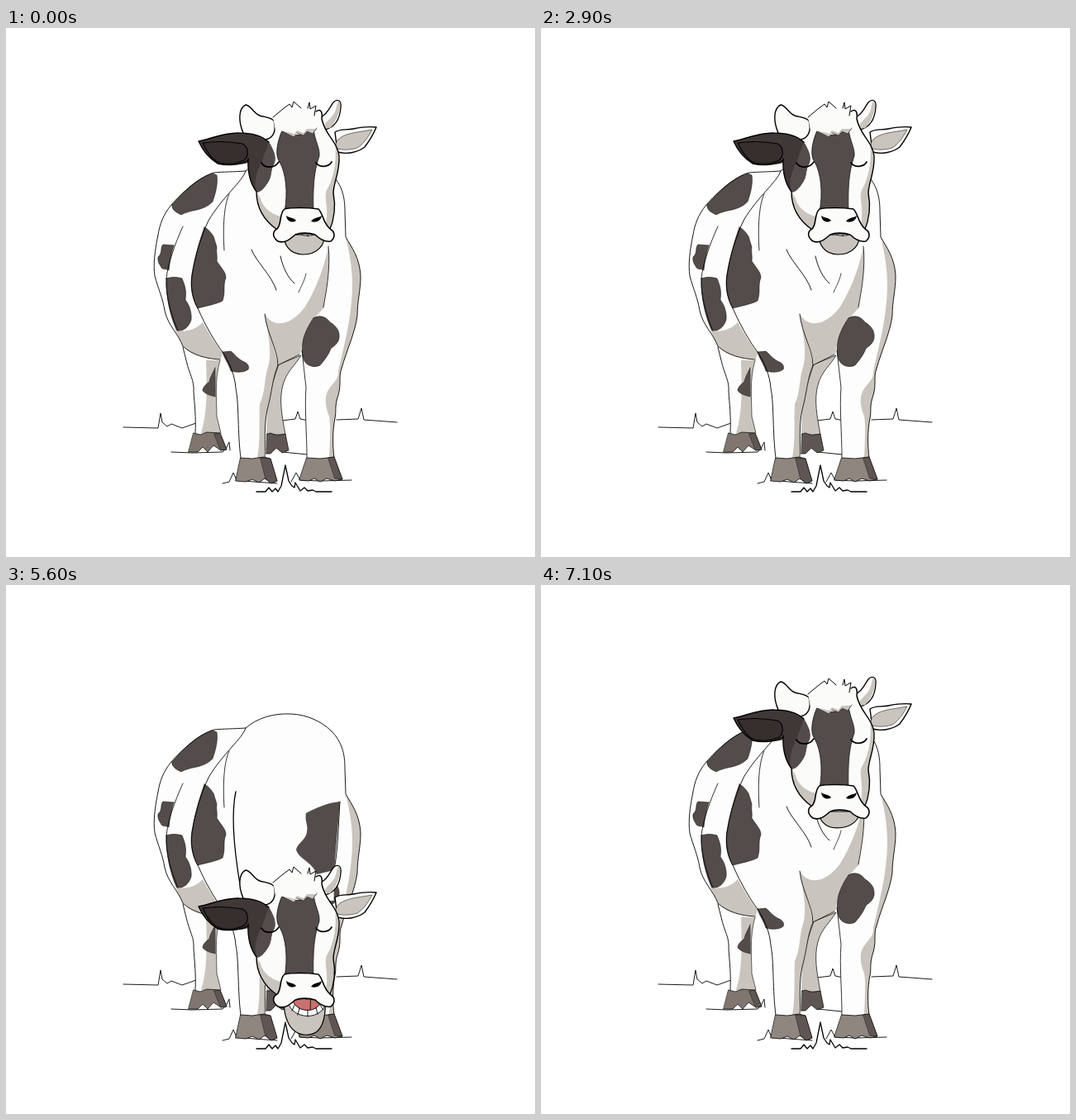
An HTML page with a canvas that plays this animation: 640 px wide and 640 px high, repeating every 7200 ms.

```html
<!DOCTYPE html>
<html>
<head>
<meta charset="utf-8">
<title>Grazing cow</title>
<style>
html, body { margin: 0; width: 100%; height: 100%; overflow: hidden; background: #fff; }
canvas { display: block; width: 640px; height: 640px; }
</style>
</head>
<body>
<canvas id="stage" width="640" height="640"></canvas>
<script>
const ctx = document.getElementById('stage').getContext('2d');
const INK = '#000', BODY = '#fdfdfd', HEAD = '#fbfbf9', SHADE = '#c9c5be';
const SPOT = '#544c4a', DARK = '#403837', HOOF = '#8f8680', HOOF_DARK = '#5f5654';
const LOOP = 7200, TICK = 100, FRAME = 40, STEP = 12, MAX_STEPS = 22;

// Each part: path, fill colour (or null), line width (or 0).
const part = (d, fill, width = 0) => ({ path: new Path2D(d), fill, width });
const line = (d, width = 0.9) => part(d, null, width);

function paint({ path, fill, width }) {
  if (fill) { ctx.fillStyle = fill; ctx.fill(path); }
  if (width) { ctx.lineWidth = width; ctx.strokeStyle = INK; ctx.stroke(path); }
}

const ground = [
  line('M142 483 L184 484 L187 466 L189 477 L195 482 L200 479 L213 484 L230 478'),
  line('M334 475 L350 473 L353 464 L356 473 L366 475'),
  line('M400 474 L426 473 L430 460 L433 474 L473 477'),
  line('M200 513 L225 514 L262 513 L266 509 L270 501 L271 511'),
  line('M335 513 L364 516'),
  line('M262 551 L270 549 L275 538 L279 547 L300 549 L328 551'),
  line('M345 549 L351 538 L356 547 L380 548 L418 547'),
  line('M303 561 L314 561 L318 556 L322 561 L326 557 L329 561 L333 554 L338 529 L342 548 L346 554 L349 556 L350 550 L356 560 L361 556 L365 560 L371 559 L375 561 L394 561', 1.3)
];

const rear = [
  part('M214 386 L218 402 C222 420 228 426 227 440 C228 455 230 470 229 490 L260 490 L255 470 C255 445 252 424 259 402Z', BODY),
  part('M242 402 L259 402 C252 425 255 450 255 470 L260 490 L236 490 C244 465 243 435 242 402Z', SHADE),
  part('M253 411 C249 420 247 422 246 428 C240 432 236 438 239 440 C245 445 250 445 253 446Z', SPOT, 0.4),
  line('M214 386 L218 402 C222 420 228 426 227 440 C228 455 230 470 229 490'),
  line('M259 402 C252 425 255 450 255 470 L260 490', 0.6),
  part('M227 490 L235 492 L243 489 L259 490 L267 510 L260 511 L251 505 L244 513 L238 507 L232 513 L221 513Z', '#80766f', 0.7),
  part('M252 491 L259 490 L267 510 L260 511Z', HOOF_DARK, 0.5),
  part('M330 407 L357 396 C350 408 339 416 335 432 C330 450 334 470 338 492 L313 492 C313 465 318 440 330 407Z', SHADE, 0.7),
  part('M313 492 L320 490 L328 493 L338 491 L342 511 L334 514 L327 508 L320 515 L312 515Z', HOOF_DARK, 0.7)
];

const flank = 'M290 173 C276 174 262 174 252 175 C235 179 212 200 200 214 C190 226 186 238 184 250 C180 270 178 285 180 300 C184 315 190 328 192 342 C196 360 208 369 214 385 C226 396 242 400 259 401';
const trunk = [
  part(flank + ' L310 400 L310 173Z', BODY),
  part('M201 214 C215 198 230 182 250 176 L255 178 C257 190 252 204 250 210 C239 222 224 219 212 226 C205 223 200 219 201 214Z', SPOT, 0.5),
  part('M203 263 L190 262 C186 266 190 272 184 277 C183 284 187 287 188 290 C192 293 194 291 197 293 C198 282 200 272 203 263Z', SPOT, 0.5),
  part('M194 303 C200 301 207 301 213 303 C218 315 218 320 217 329 C222 335 225 345 224 353 C221 362 216 366 207 367 C199 350 193 325 194 303Z', SPOT, 0.5),
  part('M205 366 C218 368 230 365 238 356 C246 370 254 384 262 393 L260 400 C240 400 222 394 214 384Z', SHADE),
  line(flank),
  line('M214 240 C204 262 196 285 194 303 C193 325 201 350 208 366', 0.8)
];

const hump = 'M290 173 C305 160 325 155 345 156 C365 157 381 165 393 176 C407 190 410 205 410 222 L411 253';
const rightSide = 'C418 265 428 278 429 300 C429 318 425 330 425 348 C422 370 412 390 406 412 C402 422 406 430 402 444 C397 458 400 464 398 472 C395 487 395 505 397 520';
const leftEdge = 'M290 173 C286 186 262 204 245 233 C236 252 229 276 226 294 C222 312 226 330 233 341 C240 358 254 382 262 392 C270 404 277 420 278 436 C282 455 280 490 284 520';
const front = [
  part(hump + rightSide + ' L364 520 C364 490 361 460 363 435 L358 390 L329 408 C322 425 322 440 316 462 L314 520 L284 520 C280 490 282 455 278 436 C277 420 270 404 262 392 C250 376 240 358 233 341 C222 325 222 310 226 294 C229 276 236 252 245 233Z', BODY),
  part('M240 241 C244 243 247 246 251 252 L255 265 C254 272 256 275 255 282 C260 290 266 295 266 302 C262 312 266 318 262 330 C255 334 243 336 232 339 C224 325 222 310 226 292 C229 275 235 255 240 241Z', SPOT, 0.5),
  part('M411 253 C418 265 428 278 429 300 C429 318 425 330 425 348 C422 370 412 390 406 412 C402 422 406 430 402 444 C397 458 400 464 398 472 C395 487 395 505 397 520 L391 520 C392 500 393 480 391 470 C385 455 386 444 390 438 C397 427 403 425 402 415 C409 385 415 360 417 340 C422 305 417 278 411 253Z', SHADE),
  part('M390 264 C386 288 374 318 362 337 C350 354 327 368 313 346 C314 356 316 366 321 374 C326 386 328 396 329 408 L356 394 C360 372 368 355 384 339 C386 318 393 295 390 264Z', SHADE),
  part('M316 364 L322 376 L329 408 C322 425 322 440 316 462 C312 480 314 500 312 520 L304 520 C308 500 306 475 307 455 C314 440 312 425 317 410 C321 398 319 380 316 364Z', SHADE),
  part('M372 351 C380 346 388 350 392 356 C399 360 404 366 403 375 C402 382 396 385 393 388 C390 396 385 402 380 408 C372 412 364 408 361 403 C357 394 358 380 361 372 C364 364 367 358 372 351Z', SPOT, 0.5),
  part('M262 392 L272 391 C278 396 280 400 288 404 C292 405 295 410 293 413 C288 417 280 417 272 415 C270 407 264 400 262 392Z', SPOT, 0.5),
  line(hump + rightSide),
  line(leftEdge),
  line('M270 201 C264 213 262 240 264 269', 0.8),
  line('M313 346 C316 372 328 385 329 408 C322 425 322 440 316 462 C312 480 314 500 313 520', 0.8),
  line('M329 408 L355 395 M358 390 C360 405 361 420 363 435 C361 460 364 490 364 520', 0.8),
  line('M297 268 C302 282 322 300 327 317'),
  line('M332 276 C335 290 341 302 349 309'),
  line('M363 297 C361 307 356 314 354 320', 0.7),
  line('M390 264 C393 292 387 320 384 338', 0.8),
  part('M284 520 L298 521 L312 519 L320 521 L328 548 L321 551 L313 545 L306 550 L298 546 L290 549 L278 548Z', HOOF, 0.8),
  part('M308 520 L320 521 L328 548 L321 551 L314 545Z', HOOF_DARK, 0.5),
  part('M364 520 L380 521 L397 519 L407 546 L398 548 L388 545 L380 549 L373 545 L366 548 L355 547Z', HOOF, 0.8),
  part('M390 520 L397 519 L407 546 L398 545Z', HOOF_DARK, 0.5)
];

const neck = [
  part('M278 250 C272 278 276 320 283 362 L300 430 L396 430 L397 345 L404 262 L340 235Z', BODY),
  part('M404 262 C390 263 374 270 363 276 C361 286 366 290 364 299 C363 308 353 312 351 320 C354 332 370 334 376 350 L397 345Z', SPOT),
  line('M278 250 C272 278 276 320 283 362', 1.3),
  line('M404 262 C402 290 402 318 397 345')
];

const skull = [
  part('M398 126 C405 121 412 124 420 122 C430 120 440 119 448 120 C444 130 440 136 434 144 C425 151 412 153 401 150Z', HEAD, 1.4),
  part('M399 141 C400 132 412 128 425 126 L443 123 C438 132 433 140 425 145 C415 148 405 148 399 145Z', SHADE, 0.5),
  part('M381 108 C390 103 392 95 396 90 C400 86 406 86 405 96 C404 110 398 120 386 123Z', HEAD, 1.3),
  part('M402 88 C407 92 402 112 392 121 L384 122 C386 110 398 110 400 94Z', SHADE),
  part('M300 135 C310 122 325 122 345 112 L376 101 C382 97 383 104 382 112 C388 130 401 138 403 155 C404 175 396 187 396 200 C399 215 396 235 390 246 L330 246 C315 235 304 225 303 205 C303 195 294 180 293 165Z', HEAD),
  part('M303 198 C303 216 311 232 328 244 L333 228 C322 226 310 217 308 206Z', SHADE),
  part('M398 138 C404 150 404 175 396 192 C399 212 398 232 390 246 L387 238 C391 215 384 207 388 196 C395 185 401 165 398 138Z', SHADE),
  part('M334 124 C345 133 362 130 372 122 C374 138 380 145 379 155 C374 170 371 185 372 222 L337 222 C341 200 339 176 331 162 C325 154 328 138 334 124Z', SPOT, 0.7),
  part('M287 127 C281 113 281 97 290 93 C297 94 299 103 307 106 C314 108 320 105 324 112 C327 122 325 133 314 135Z', HEAD),
  line('M287 127 C281 113 281 97 290 93 C297 94 299 103 307 106 C314 108 320 108 324 112 C327 122 325 133 314 135', 1.4),
  part('M323 108 L335 98 L343 92 L346 96 L348 89 L357 97 L361 96 L367 90 L368 98 L375 94 L373 106 L376 122 L371 128 L364 125 L360 130 L352 127 L348 131 L336 125 L326 124Z', HEAD),
  line('M323 108 L335 98 L343 92 L346 96 L348 89 L357 97 M365 97 L367 90 L368 98 L375 94 L373 106', 1),
  part('M376 122 L371 128 L364 125 L360 130 L352 127 L348 131 L336 125 L342 126 L349 128 L352 124 L360 127 L364 122Z', SHADE),
  line('M376 121 L371 128 L364 125 L360 130 L352 127', 0.6),
  line('M375 101 C382 96 383 104 382 110 C386 130 401 137 403 155 C404 175 396 187 396 200 C399 215 397 232 391 246', 1.4),
  part('M233 137 C245 135 265 126 282 127 C297 127 310 132 318 138 C324 148 327 155 325 163 C320 170 322 178 318 185 C312 195 306 200 303 198 C297 190 293 178 293 163 C283 166 268 167 256 164 C246 158 238 148 233 137Z', DARK),
  part('M318 138 C324 148 327 155 325 163 C320 170 322 178 318 185 C312 195 306 200 303 198 C299 185 304 172 309 163Z', SPOT),
  part('M238 139 C252 137 270 137 286 140 C294 144 294 155 288 160 C275 166 262 165 254 161 C246 155 242 148 238 139Z', '#362f2e', 1.2),
  line('M318 138 C310 131 297 127 282 127 C265 126 245 135 233 137 C238 148 246 158 256 164 C268 167 283 166 293 160', 1.4),
  line('M293 158 C292 178 297 190 303 198 C303 216 311 232 328 244', 1.4),
  line('M309 163 C313 170 325 170 330 162', 1.7),
  line('M375 163 C379 169 390 169 394 162', 1.7)
];

const muzzle = [
  part('M337 219 C345 217 365 217 378 219 C384 225 383 235 392 243 C399 247 398 254 393 258 C386 259 380 256 374 250 C365 247 355 248 350 250 C343 256 337 261 329 258 C322 253 322 246 328 243 C334 237 330 225 337 219Z', HEAD, 1.6),
  part('M339 227 C343 230 348 229 351 233 C347 236 340 235 339 227Z', INK),
  part('M382 227 C378 230 372 229 369 234 C374 236 381 234 382 227Z', INK)
];

const mouth = [
  part('M342 236 L388 236 L382 254 C378 267 350 267 347 254Z', '#c9716f', 0.8),
  line('M369 240 L368 264', 0.8),
  part('M341 253 C346 276 384 276 387 253 L381 252 C378 267 352 267 347 252Z', '#fff', 0.9),
  line('M349 257 L346 264 M355 261 L353 269 M365 263 L365 271 M375 260 L377 268 M380 257 L384 263', 0.9)
];

// Chewing: [share of one chew, jaw drop in px]
const CHEW_FRAMES = 72 / 7;
const CHEW = [[0, 5], [0.2, 1], [0.25, 0], [0.6, 24], [0.86, 6], [1, 5]];

function jawDrop(frame) {
  const u = (frame / CHEW_FRAMES) % 1;
  const i = CHEW.findIndex(([at]) => at > u);
  const [u0, d0] = CHEW[i - 1], [u1, d1] = CHEW[i];
  return d0 + (d1 - d0) * (u - u0) / (u1 - u0);
}

function headDrop(frame) {
  const steps = Math.min(frame - 119, 179 - frame, MAX_STEPS);
  return STEP * Math.max(0, steps);
}

function drawJaw(drop) {
  const chin = 269 + drop;
  const jaw = part(`M336 250 C336 ${258 + drop * 0.5} 342 ${chin} ${358 + drop * 0.25} ${chin}
    C${376 + drop * 0.3} ${chin} 387 ${258 + drop * 0.6} ${384 + drop * 0.1} 250Z`, SHADE, 1.2);
  paint(jaw);
  ctx.save();
  ctx.clip(jaw.path);
  ctx.translate(0, drop - 24);
  mouth.forEach(paint);
  ctx.restore();
}

function drawNeck(drop) {
  ctx.save();
  ctx.beginPath();
  ctx.rect(0, 0, 640, drop + 130);
  ctx.clip();
  if (drop + 130 > 250) neck.forEach(paint);
  ctx.restore();
}

function draw(time) {
  const frame = Math.floor(Math.floor(time / TICK) * TICK / FRAME);
  const drop = headDrop(frame);
  ctx.fillStyle = '#fff';
  ctx.fillRect(0, 0, 640, 640);
  ctx.lineJoin = ctx.lineCap = 'round';
  [ground, rear, trunk, front].forEach(group => group.forEach(paint));
  drawNeck(drop);
  ctx.save();
  ctx.translate(0, drop);
  skull.forEach(paint);
  drawJaw(jawDrop(frame));
  muzzle.forEach(paint);
  ctx.restore();
}

const start = performance.now();
function tick() {
  draw((performance.now() - start) % LOOP);
  requestAnimationFrame(tick);
}
tick();
</script>
</body>
</html>
```
